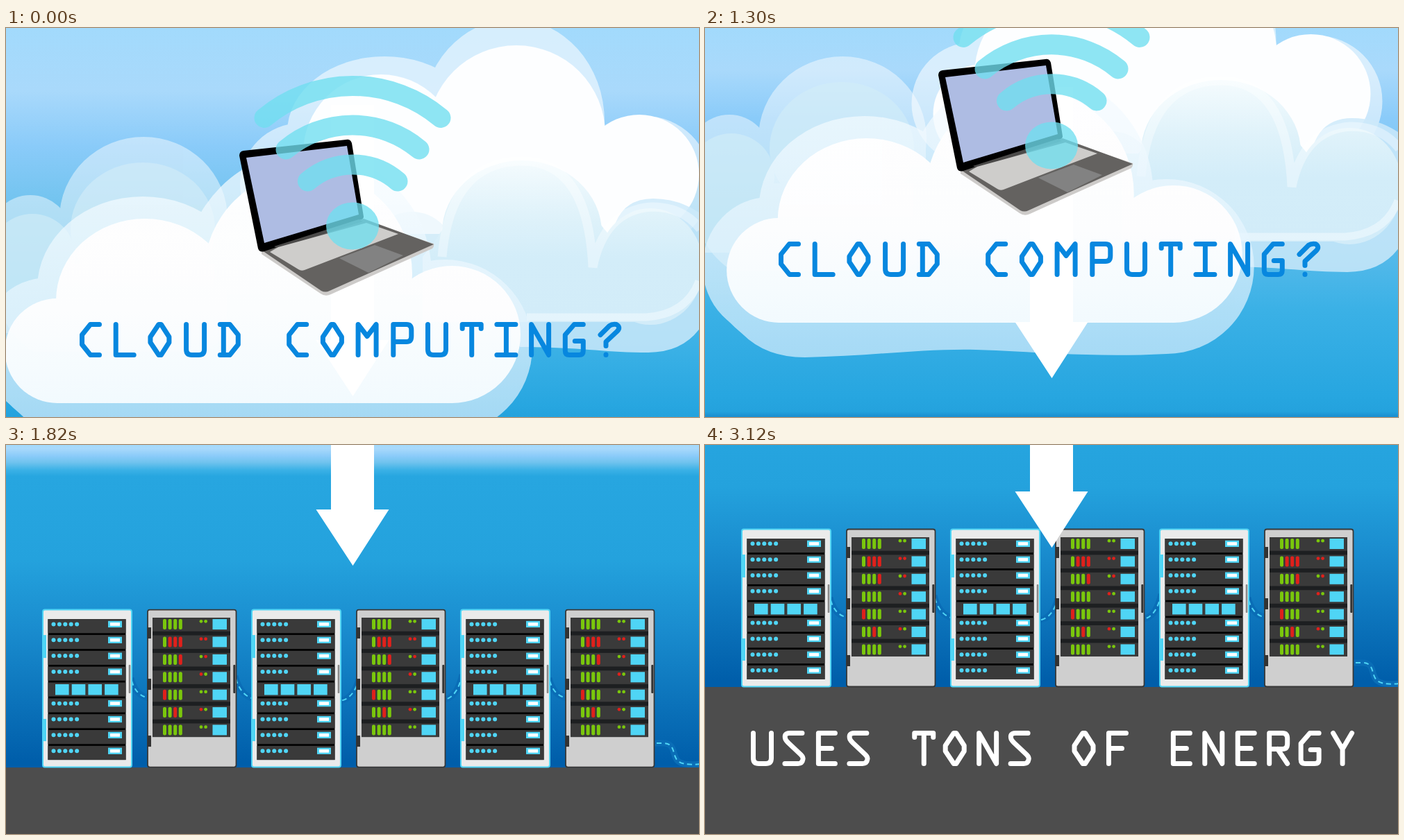
Animation of 998 by 561 pixels, one loop 4.16 s. Source, as an HTML page:

```html
<!DOCTYPE html>
<html lang="en">
<head>
<meta charset="utf-8">
<title>Cloud computing uses tons of energy</title>
<style>
  html, body { margin: 0; width: 100%; height: 100%; overflow: hidden; background: #27a6e0; }
  svg { display: block; width: 100%; height: 100%; }
  .letters { fill: none; stroke-width: 7; stroke-linecap: round; stroke-linejoin: round; }
</style>
</head>
<body>
<svg viewBox="0 0 998 561" preserveAspectRatio="none">
  <defs>
    <linearGradient id="sky" gradientUnits="userSpaceOnUse" x1="0" y1="-100" x2="0" y2="900"></linearGradient>
    <linearGradient id="frontRim" gradientUnits="userSpaceOnUse" x1="0" y1="240" x2="0" y2="590">
      <stop offset="0" stop-color="#f4fbff"/><stop offset=".5" stop-color="#e6f5fe"/>
      <stop offset="1" stop-color="#d4edfd"/>
    </linearGradient>
    <linearGradient id="frontFill" gradientUnits="userSpaceOnUse" x1="0" y1="205" x2="0" y2="541">
      <stop offset="0" stop-color="#fff"/><stop offset=".6" stop-color="#fefeff"/>
      <stop offset="1" stop-color="#f5fbff"/>
    </linearGradient>
    <linearGradient id="mist" gradientUnits="userSpaceOnUse" x1="0" y1="185" x2="0" y2="430">
      <stop offset="0" stop-color="#f6fcfe"/><stop offset=".35" stop-color="#dff2fa"/>
      <stop offset=".6" stop-color="#d3edf9"/><stop offset="1" stop-color="#d2ecf9"/>
    </linearGradient>
    <g id="rackA"></g>
    <g id="rackB"></g>
  </defs>

  <rect width="998" height="561" fill="url(#sky)"/>

  <g id="world">
    <g id="back">
      <g fill="#fff" opacity=".56">
        <ellipse cx="730" cy="135" rx="132" ry="148"/>
        <ellipse cx="545" cy="150" rx="140" ry="109"/>
        <circle cx="425" cy="225" r="88"/>
        <circle cx="920" cy="222" r="95"/>
        <path d="M425 150H920V317H425Z"/>
      </g>
      <g fill="#fdfeff">
        <circle cx="735" cy="153" r="128"/>
        <ellipse cx="540" cy="180" rx="112" ry="113"/>
        <circle cx="440" cy="240" r="72"/>
        <circle cx="912" cy="211" r="86"/>
        <path d="M440 180H912V297H440Z"/>
      </g>
    </g>

    <!-- still cloud, right -->
    <path d="M640 330H870Q870 246 932 246Q975 246 1010 275V415Q985 468 925 468C860 468 830 460 740 460Z" fill="#cdeafb" opacity=".84"/>
    <ellipse cx="585" cy="325" rx="60" ry="60" fill="#e6f5fc" opacity=".6"/>
    <g fill="url(#mist)">
      <ellipse cx="743" cy="295" rx="115" ry="104"/>
      <ellipse cx="928" cy="344" rx="76" ry="84"/>
      <path d="M600 330Q625 300 640 270H845L870 300H985Q998 320 998 350Q990 424 925 424H600Z"/>
    </g>
    <path d="M628 330Q640 192 743 192Q838 192 845 345Q862 262 930 258Q975 258 1000 290" fill="none" stroke="#fff" stroke-opacity=".36" stroke-width="13"/>
    <path d="M750 417H922Q980 413 998 365" fill="none" stroke="#fff" stroke-opacity=".4" stroke-width="11"/>

    <!-- still cloud, left -->
    <g fill="#fff" opacity=".46">
      <ellipse cx="198" cy="275" rx="121" ry="118"/>
      <circle cx="35" cy="300" r="59"/>
      <path d="M-10 290H318V440Q300 467 260 467H40Q0 440 -10 400Z"/>
    </g>
    <g fill="#d3eef8" opacity=".62">
      <ellipse cx="197" cy="290" rx="104" ry="96"/>
      <circle cx="38" cy="330" r="62"/>
      <path d="M-10 340H300V440H-10Z"/>
    </g>

    <g id="front">
      <g fill="url(#frontRim)" opacity=".72">
        <ellipse cx="60" cy="460" rx="96" ry="100"/>
        <ellipse cx="197" cy="375" rx="152" ry="132"/>
        <circle cx="435" cy="355" r="178"/>
        <circle cx="632" cy="460" r="126"/>
        <path d="M-35 470Q-30 515 21 557Q55 591 111 591C200 590 280 578 358 580S520 592 632 586L700 460Z"/>
      </g>
      <g fill="url(#frontFill)" opacity=".97">
        <circle cx="74" cy="465.5" r="75.5"/>
        <ellipse cx="200" cy="393" rx="128" ry="118"/>
        <circle cx="435" cy="355" r="150"/>
        <circle cx="642" cy="442" r="99"/>
        <path d="M74 392H642V541H74Z"/>
      </g>
    </g>

    <g transform="translate(0 743)">
      <g id="cables" fill="none"></g>
      <rect y="349" width="998" height="240" fill="#4d4d4d"/>
      <use href="#rackA"/><use href="#rackA" x="301"/><use href="#rackA" x="602"/>
      <use href="#rackB"/><use href="#rackB" x="301"/><use href="#rackB" x="602"/>
    </g>

    <path id="arrow" d="M468-420H530V-81H551.5L499.500 0L446.500-81H468Z" fill="#fff"/>

    <!-- laptop -->
    <path d="M368 320V326L453 383Q460 388 468 384L614 318Q617 315 616 311L515 277Z" fill="#cdcbc9"/>
    <path d="M369 321L515 275L616 312L466 379Q460 382 454 379Z" fill="#646260"/>
    <path d="M336 184Q336 178 342 177L490 161Q496 160 498 166L515 272Q515 275 512 276L372 322Q365 324 363 318Z" fill="#000"/>
    <path d="M346 187L491 170L508 269L372 310Z" fill="#aebce3"/>
    <path d="M386 315L508 276L514 279L392 318Z" fill="#4b4a49"/>
    <path d="M380 323L392 316L519 281L565 297L430 349Q425 351 421 348Z" fill="#cecdcb"/>
    <path d="M480 332L531 313L572 328L522 353Z" fill="#828282"/>

    <!-- wireless sign -->
    <g opacity=".78" fill="none" stroke="#70dff0" stroke-width="29" stroke-linecap="round">
      <path d="M372 129.500A198 198 0 0 1 626 129.500"/>
      <path d="M403 175A149 149 0 0 1 595 175"/>
      <path d="M434.500 221A99 99 0 0 1 564 221"/>
      <ellipse cx="499" cy="285.500" rx="38" ry="34" fill="#70dff0" stroke="none"/>
    </g>

    <g id="question" class="letters" stroke="#0787df" role="img"></g>
    <g id="answer" class="letters" stroke="#fff" role="img"></g>
  </g>
</svg>

<script>
const $ = id => document.getElementById(id);
const CYAN = '#4fd5f5', DARK = '#3a3a3a', GREEN = '#7ac70c', RED = '#e0201b';
const rect = (x, y, w, h, fill, rest = '') =>
  `<rect x="${x}" y="${y}" width="${w}" height="${h}" fill="${fill}" ${rest}/>`;
const dot = (x, y, r, fill) => `<circle cx="${x}" cy="${y}" r="${r}" fill="${fill}"/>`;

// Stroke lettering: each glyph is 27 wide and 44 high
const GLYPHS = {
  C: 'M25 0H12L0 15V29L12 44H25',
  D: 'M0 0H14L26 15V29L14 44H0M5 0V44',
  E: 'M26 0H2V44H26M2 22H21',
  F: 'M2 44V0H27M2 22H21',
  G: 'M26 0H13L0 15V38Q0 44 6 44H20Q26 44 26 38V24H14',
  I: 'M1 0H28M14.500 0V44M1 44H28',
  L: 'M-1 0V44H25',
  M: 'M0 44V0L13 17L26 0V44',
  N: 'M1 44V0L26 44V0',
  O: 'M11 0H14.500L26 18V26L14.500 44H11L-1 26V18Z',
  P: 'M1 44V0H20Q27 0 27 8V17Q27 25 20 25H1',
  R: 'M1 44V0H20Q27 0 27 8V15Q27 23 20 23H1M13 23L27 44',
  S: 'M25 0H7Q-2 0 1 9Q2 11 5 14L23 31Q27 35 26 38Q25 44 19 44H0',
  T: 'M1 6V0H28V6M14.500 0V44',
  U: 'M1 0V36Q1 44 9 44H19Q27 44 27 36V0',
  Y: 'M0 0L13.500 23L27 0M13.500 23V44',
  '?': 'M1 15L14 2Q18-1 24 0Q31 4 25 10L9 25V31M9 43.500V44'
};

function letter(id, words, x, y, step) {
  $(id).setAttribute('aria-label', words);
  $(id).innerHTML = [...words].map((ch, i) => ch === ' ' ? '' :
    `<path d="${GLYPHS[ch]}" transform="translate(${x + i * step} ${y})"/>`).join('');
  return [...$(id).children];
}
letter('question', 'CLOUD COMPUTING?', 109.5, 427.5, 49.7);
const typed = letter('answer', 'USES TONS OF ENERGY', 68.5, 1158.5, 46.45);

function rackA() {
  let s = rect(53, 121.5, 128, 227, '#ebebeb', `rx="3" stroke="${CYAN}" stroke-width="2"`)
    + rect(60.5, 135, 112, 203, '#000')
    + rect(53, 158, 5, 33, CYAN) + rect(53, 279, 5, 32, CYAN)
    + rect(176.7, 201, 2.6, 41, '#8a8a8a', 'rx="1"');
  for (let i = 0; i < 9; i++) {
    const y = 135 + i * 22.85;
    s += rect(60.5, y, 112, 20.2, DARK);
    if (i === 4) {
      for (let k = 0; k < 4; k++) s += rect(71 + k * 23.7, y + 2.5, 19.6, 15.5, CYAN);
      continue;
    }
    for (let k = 0; k < 5; k++) s += dot(68.5 + k * 8.4, y + 7.3, 3, CYAN);
    s += rect(147, y + 2.7, 20, 9.3, CYAN) + rect(150, y + 5, 14, 4.7, '#fff');
  }
  return s;
}

function rackB() {
  const bars = ['gggg', 'grrr', 'gggr', 'gggg', 'rggg', 'ggrg', 'gggg'];
  const lamps = ['gg', 'rr', 'gr', 'rg', 'gg', 'rg', 'gg'];
  const tint = c => c === 'g' ? GREEN : RED;
  let s = rect(204, 121.5, 127.5, 227, '#cfcfcf', 'rx="3" stroke="#383838" stroke-width="1.8"')
    + rect(211, 133, 112, 172, '#1d1f21')
    + rect(327.3, 201, 3, 41, '#333', 'rx="1"');
  for (const y of [147, 221, 303]) s += rect(203.500, y, 5.5, 16, '#333');
  for (let i = 0; i < 7; i++) {
    const y = 133 + i * 25.4;
    s += rect(211, y, 112, 19.6, DARK);
    [...bars[i]].forEach((c, k) => s += rect(226 + k * 7.6, y + 2, 5, 15, tint(c), 'rx="2"'));
    [...lamps[i]].forEach((c, k) => s += dot(281 + k * 6.6, y + 5.2, 2.4, tint(c)));
    s += rect(297.5, y + 2, 20.5, 15, CYAN);
  }
  return s;
}
$('rackA').innerHTML = rackA();
$('rackB').innerHTML = rackB();

$('cables').innerHTML = [
  'M180 220Q186 247 208 249', 'M330 217Q337 246 358 250', 'M480 253Q500 251 508 222',
  'M632 251Q650 247 657 215', 'M782 220Q788 247 810 249',
  'M933 314H945C963 313 960 328 965 336Q970 347 1000 344'
].map(d => `<path d="${d}" stroke="#0a6db6" stroke-width="9"/>
  <path d="${d}" stroke="${CYAN}" stroke-width="2" stroke-dasharray="7 5" stroke-dashoffset="-4"/>`).join('');

// Sky colours with their heights at five moments of the descent
const SKY = [
  ['#a2dafc', 0, 0, 0, 0, -90],
  ['#a9d9fb', 90, 60, 40, 5, -80],
  ['#8acbf9', 170, 130, 110, 16, -70],
  ['#70c3ee', 260, 240, 155, 25, -60],
  ['#3bb1e6', 460, 405, 235, 36, -50],
  ['#27a6e0', 545, 530, 300, 45, -40],
  ['#24a2dd', 561, 553, 370, 165, 60],
  ['#1a8dcf', 575, 561, 430, 262, 150],
  ['#005eaa', 800, 640, 561, 456, 340]
];
$('sky').innerHTML = SKY.map(([c]) => `<stop stop-color="${c}"/>`).join('');
const stops = [...$('sky').children];

const STEP = 130, LOOP = 4160, LAST = 24;
const move = (id, x, y) => $(id).setAttribute('transform', `translate(${x} ${y})`);

function draw(n) {
  const p = Math.min(1, Math.max(0, (n - 8) / 8));
  move('world', 0, -743 * p * p * (3 - 2 * p));
  move('front', 3.27 * n, 0);
  move('back', -3.95 * n, 0);
  move('arrow', 0, 531 + 360 * p);

  const k = Math.min(3, Math.floor(p * 4)), mix = p * 4 - k;
  SKY.forEach((row, i) => {
    const y = row[k + 1] + (row[k + 2] - row[k + 1]) * mix;
    stops[i].setAttribute('offset', (y + 100) / 1000);
  });

  typed.forEach((el, i) => el.setAttribute('visibility', i < 2 * (n - 16) ? 'visible' : 'hidden'));
}

let start, shown = -1;
function tick(now) {
  start ??= now;
  const n = Math.min(LAST, Math.floor((now - start) % LOOP / STEP));
  if (n !== shown) draw(shown = n);
  requestAnimationFrame(tick);
}
draw(0);
requestAnimationFrame(tick);
</script>
</body>
</html>
```
